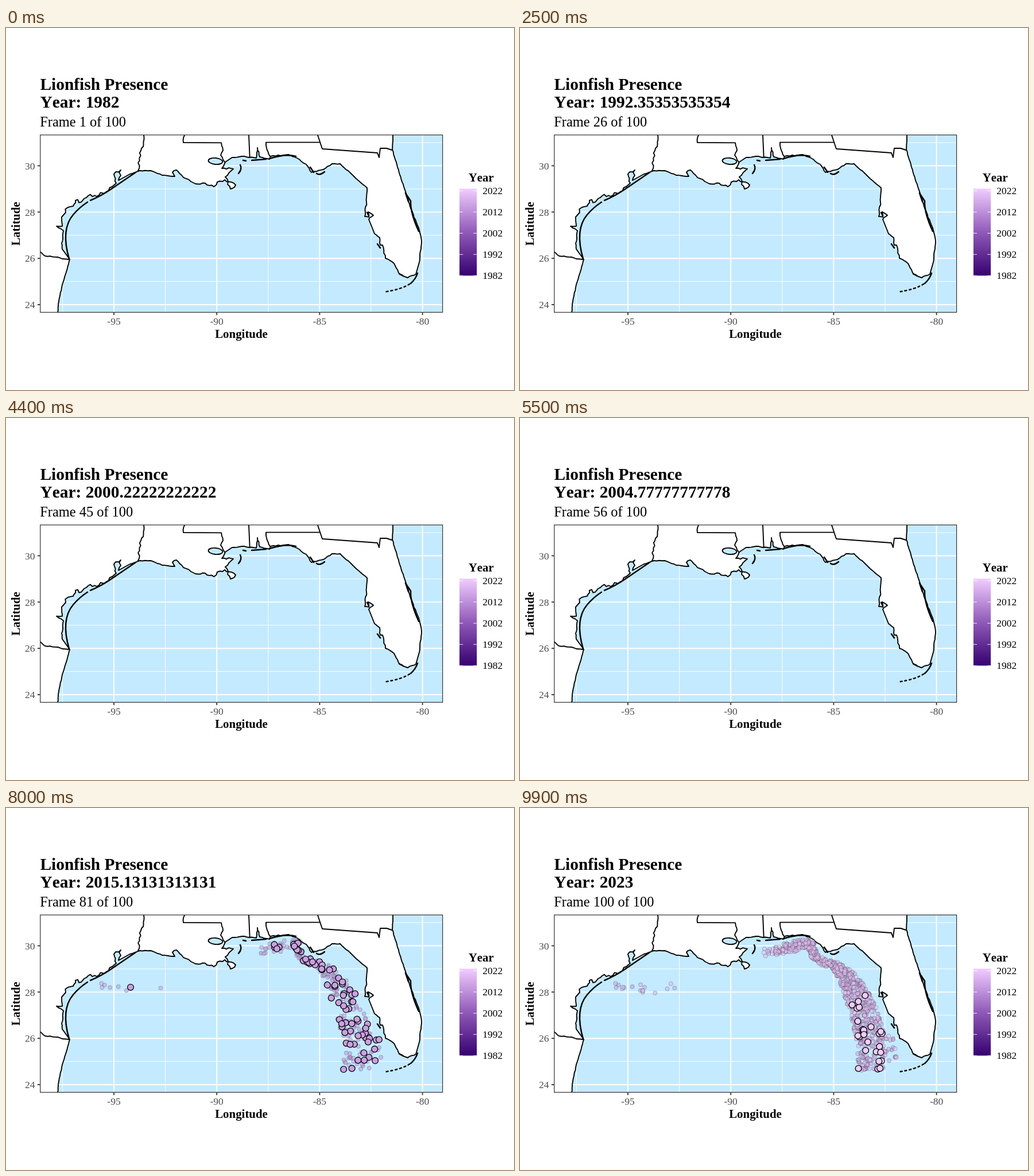
Recreate the animation shown at these times as an HTML page with a canvas. Size 885x632 px, loop 10 s.

```html
<!DOCTYPE html>
<html lang="en">
<head>
<meta charset="utf-8">
<title>Lionfish Presence</title>
<style>
html, body { margin: 0; width: 885px; height: 632px; overflow: hidden; background: #fff; }
canvas { display: block; }
</style>
</head>
<body>
<canvas id="stage" width="885" height="632"></canvas>
<script>
const ctx = document.getElementById('stage').getContext('2d');
const SERIF = '"Liberation Serif", "Times New Roman", serif';
const FRAMES = 100, STEP = 100, START = 1982, END = 2023, SPAN = END - START;
const WATER = '#c4eaff';
const BOX = { x: 59.7, y: 186.7, w: 700.9, h: 309.7 };
const lonX = lon => 188 + (lon + 95) * 35.84;
const latY = lat => 240.5 + (30 - lat) * 40.42;
const mix = (a, b, u) => a + (b - a) * u;

// Deterministic random numbers
function rng(seed) {
  return () => {
    seed = (seed + 0x6D2B79F5) | 0;
    let n = Math.imul(seed ^ (seed >>> 15), 1 | seed);
    n = (n + Math.imul(n ^ (n >>> 7), 61 | n)) ^ n;
    return ((n ^ (n >>> 14)) >>> 0) / 4294967296;
  };
}

// Joins key points by lines that wander sideways by up to amp
const keys = text => text.split(' ').map(p => p.split(',').map(Number));
const wander = rng(4);
function rough(text, amp = 0.6) {
  const pts = keys(text), out = [pts[0]];
  for (let i = 1; i < pts.length; i++) {
    const [x1, y1] = pts[i - 1], [x2, y2] = pts[i];
    const dx = x2 - x1, dy = y2 - y1, len = Math.hypot(dx, dy), n = Math.ceil(len / 5);
    for (let k = 1; k < n; k++) {
      const side = (wander() * 2 - 1) * amp / len;
      out.push([x1 + dx * k / n - dy * side, y1 + dy * k / n + dx * side]);
    }
    out.push(pts[i]);
  }
  return out.join(' ');
}

// Coast from the south-west corner round to the north-east
const coast = 'M' + [
  rough('90,497 92,477 98,448 104,429 111,404', 0.4),
  rough('98,386 97,376 100,354 88,346 98,346 97,330', 1),
  rough('104,322 108,313 117,311 121,301 131,304 143,293 158,294 185,277', 3),
  rough('192,271 188,255 200,248 196,266', 2),
  rough('216,255 233,249 252,249 272,257 294,259', 0.5),
  rough('290,252 297,248 306,257 322,268', 1.6),
  rough('330,272 347,271 362,277 368,269 381,265 400,274 391,281 382,260 396,246 376,245 382,234', 1.8),
  rough('394,226 411,224 436,227 438,209 442,225 459,229', 0.7),
  rough('461,224 492,221 507,227 523,238 532,252 553,247 568,237 582,237 600,253', 0.8),
  rough('610,263 629,279 628,304 625,329 632,330 631,321 640,327 632,334', 1.2),
  rough('642,359 651,366 652,379 656,379 661,402 676,411 686,430 700,436 714,430', 1),
  rough('720,409 724,372 720,353 704,312 693,277 682,243 673,212 674,186', 0.5)
].join(' ');
const shore = new Path2D(coast);
const land = new Path2D(coast + ' L60,186 60,497 Z');
const borders = new Path2D('M' + [
  rough('60,391 68,398 90,400 98,403 109,404'),
  rough('240,187 239,207 235,214 230,249', 1.8),
  rough('311,187 309,200', 1.2) + ' 375,200.4 ' + rough('376,206 378,214 374,222 381,234', 0.8),
  '423,187 424.7,226',
  rough('460,224 453,205', 2) + ' 453,199.6 546,199.6',
  '543,187 551,211 647,218 650,226 652,210 663,210 672,213'
].join('M'));
const barriers = new Path2D('M' + [
  '110,403 Q95,352 117,326 Q128,313 142,304',
  '147,301 Q166,293 182,282 L226,252',
  '408,239 Q412,246 405,254',
  '413,231 418,232 M428,231 453,229 M459,228 Q488,219 505,224',
  '530,243 536,252 M541,254 Q547,258 555,251',
  '697,290 705,302 Q704,322 719,355 M696,288 701,303',
  '629,322 632,328 M647,377 652,384 M685,429 692,433 M717,428 Q714,438 705,446'
].join('M'));
const islands = new Path2D('M703,447 Q690,456 658,461');

// Reef band: centre x, y and half width
const reef = [
  [422, 253, 6], [466, 244, 10], [504, 236, 8], [516, 264, 6], [552, 277, 8],
  [572, 300, 17], [588, 330, 22], [601, 362, 24], [610, 400, 25], [611, 458, 23]
];
function reefPoint(rand, from) {
  const t = mix(from, 1, rand() ** 0.75) * (reef.length - 1);
  const k = Math.min(Math.floor(t), reef.length - 2), u = t - k;
  const a = reef[k], b = reef[k + 1];
  const dx = b[0] - a[0], dy = b[1] - a[1];
  const side = (rand() * 2 - 1) * mix(a[2], b[2], u) / Math.hypot(dx, dy);
  return [a[0] + dx * u - dy * side, a[1] + dy * u + dx * side];
}
const strayPoint = rand => [mix(160, 270, rand()), mix(306, 323, rand())];
const islePoint = rand => [mix(632, 656, rand()), mix(395, 445, rand())];

// One survey per year; the last one covers only the southern reef
const surveys = [];
for (let year = 2010; year <= END; year++) {
  const rand = rng(year * 7), last = year === END;
  const count = last ? 27 : Math.min(88, 13 * (year - 2009));
  const pts = [];
  for (let i = 0; i < count; i++) {
    const kind = last ? 1 : rand();
    pts.push(kind < 0.015 ? strayPoint(rand) : kind < 0.04 ? islePoint(rand) : reefPoint(rand, last ? 0.67 : 0));
  }
  surveys.push({ year, at: Math.round((year - START) * (FRAMES - 1) / SPAN), pts });
}

// Year colour scale: dark, middle, light
const ramp = [[54, 0, 112], [144, 90, 184], [240, 204, 255]];
function yearColor(year) {
  const t = (year - START) / SPAN * 2, k = t < 1 ? 0 : 1;
  return `rgb(${ramp[k].map((c, i) => Math.round(mix(c, ramp[k + 1][i], t - k))).join(',')})`;
}

function text(str, x, y, size, { bold = false, color = '#000', align = 'left' } = {}) {
  ctx.font = `${bold ? 'bold ' : ''}${size}px ${SERIF}`;
  ctx.fontKerning = 'none';
  ctx.fillStyle = color;
  ctx.textAlign = align;
  ctx.fillText(str, x, y);
}
function line(x1, y1, x2, y2, color, width) {
  ctx.strokeStyle = color;
  ctx.lineWidth = width;
  ctx.beginPath();
  ctx.moveTo(x1, y1);
  ctx.lineTo(x2, y2);
  ctx.stroke();
}
function dot(x, y, r, fill, stroke, width, alpha = 1) {
  ctx.beginPath();
  ctx.arc(x, y, r, 0, Math.PI * 2);
  ctx.globalAlpha = alpha;
  ctx.fillStyle = fill;
  ctx.fill();
  ctx.strokeStyle = stroke;
  ctx.lineWidth = width;
  ctx.stroke();
  ctx.globalAlpha = 1;
}
const oldDot = (p, fill) => dot(p[0], p[1], 3.4, fill, 'rgba(70,70,70,.6)', 1.1, 0.5);
const newDot = (x, y, fill) => dot(x, y, 5.4, fill, '#000', 1.3);

function drawMap() {
  const right = BOX.x + BOX.w, bottom = BOX.y + BOX.h;
  ctx.fillStyle = WATER;
  ctx.fillRect(BOX.x, BOX.y, BOX.w, BOX.h);
  for (let lon = -97.5; lon <= -80; lon += 2.5)
    line(lonX(lon), BOX.y, lonX(lon), bottom, '#fff', lon % 5 ? 0.95 : 1.9);
  for (let lat = 24; lat <= 31; lat++)
    line(BOX.x, latY(lat), right, latY(lat), '#fff', lat % 2 ? 0.95 : 1.9);
  ctx.save();
  ctx.beginPath();
  ctx.rect(BOX.x, BOX.y, BOX.w, BOX.h);
  ctx.clip();
  ctx.lineJoin = ctx.lineCap = 'round';
  ctx.fillStyle = '#fff';
  ctx.fill(land);
  ctx.strokeStyle = '#000';
  ctx.lineWidth = 1.9;
  ctx.stroke(shore);
  ctx.stroke(borders);
  ctx.beginPath();
  ctx.ellipse(365, 232.5, 12.5, 5.5, 0.1, 0, Math.PI * 2);
  ctx.fillStyle = WATER;
  ctx.fill();
  ctx.stroke();
  ctx.lineWidth = 2.5;
  ctx.stroke(barriers);
  ctx.setLineDash([3, 5]);
  ctx.stroke(islands);
  ctx.restore();
}

function drawPoints(frame) {
  let now = -1;
  surveys.forEach((s, i) => {
    if (s.at <= frame) now = i;
    if (s.at < frame) s.pts.forEach(p => oldDot(p, yearColor(s.year)));
  });
  if (now < 0) return;
  const a = surveys[now], b = surveys[now + 1];
  const u = b ? (frame - a.at) / (b.at - a.at) : 0;
  const fill = yearColor(a.year + u);
  a.pts.forEach(([x, y], i) => {
    if (!u) return newDot(x, y, fill);
    const to = b.pts[i];
    if (to) newDot(mix(x, to[0], u), mix(y, to[1], u), fill);
  });
}

function drawAxes() {
  const grey = '#4d4d4d', bottom = BOX.y + BOX.h;
  ctx.strokeStyle = '#333';
  ctx.lineWidth = 1.2;
  ctx.strokeRect(BOX.x, BOX.y, BOX.w, BOX.h);
  for (let lon = -95; lon <= -80; lon += 5) {
    line(lonX(lon), bottom, lonX(lon), bottom + 4.8, '#333', 1.8);
    text(String(lon), lonX(lon), 518, 17.5, { color: grey, align: 'center' });
  }
  for (let lat = 24; lat <= 30; lat += 2) {
    line(BOX.x - 4.8, latY(lat), BOX.x, latY(lat), '#333', 1.8);
    text(String(lat), 50.5, latY(lat) + 6.2, 17.5, { color: grey, align: 'right' });
  }
  text('Longitude', 410, 541, 20.9, { bold: true, align: 'center' });
  ctx.save();
  ctx.translate(24, 341.7);
  ctx.rotate(-Math.PI / 2);
  text('Latitude', 0, 0, 20.9, { bold: true, align: 'center' });
  ctx.restore();
}

function drawLegend() {
  const top = 280.5, base = 432.3, x = 790, w = 30.2;
  const grad = ctx.createLinearGradient(0, base, 0, top);
  ramp.forEach((c, i) => grad.addColorStop(i / 2, `rgb(${c})`));
  ctx.fillStyle = grad;
  ctx.fillRect(x, top, w, base - top);
  for (let year = 1982; year <= 2022; year += 10) {
    const y = base - (year - START) / SPAN * (base - top);
    line(x, y, x + 6, y, '#fff', 0.9);
    line(x + w - 6, y, x + w, y, '#fff', 0.9);
    text(String(year), 830.3, y + 6, 17.5);
  }
  text('Year', 805.7, 268, 20.9, { bold: true });
}

function draw(frame) {
  ctx.fillStyle = '#fff';
  ctx.fillRect(0, 0, 885, 632);
  const year = Number((START + SPAN * frame / (FRAMES - 1)).toPrecision(15));
  text('Lionfish Presence', 59.5, 107.5, 29.4, { bold: true });
  text(`Year: ${year}`, 59.5, 139, 29.4, { bold: true });
  text(`Frame ${frame + 1} of ${FRAMES}`, 59.3, 172, 24.4);
  drawMap();
  drawPoints(frame);
  drawAxes();
  drawLegend();
}

const began = performance.now();
let shown = -1;
function tick() {
  const frame = Math.floor((performance.now() - began) / STEP) % FRAMES;
  if (frame !== shown) draw(shown = frame);
  requestAnimationFrame(tick);
}
tick();
</script>
</body>
</html>
```
